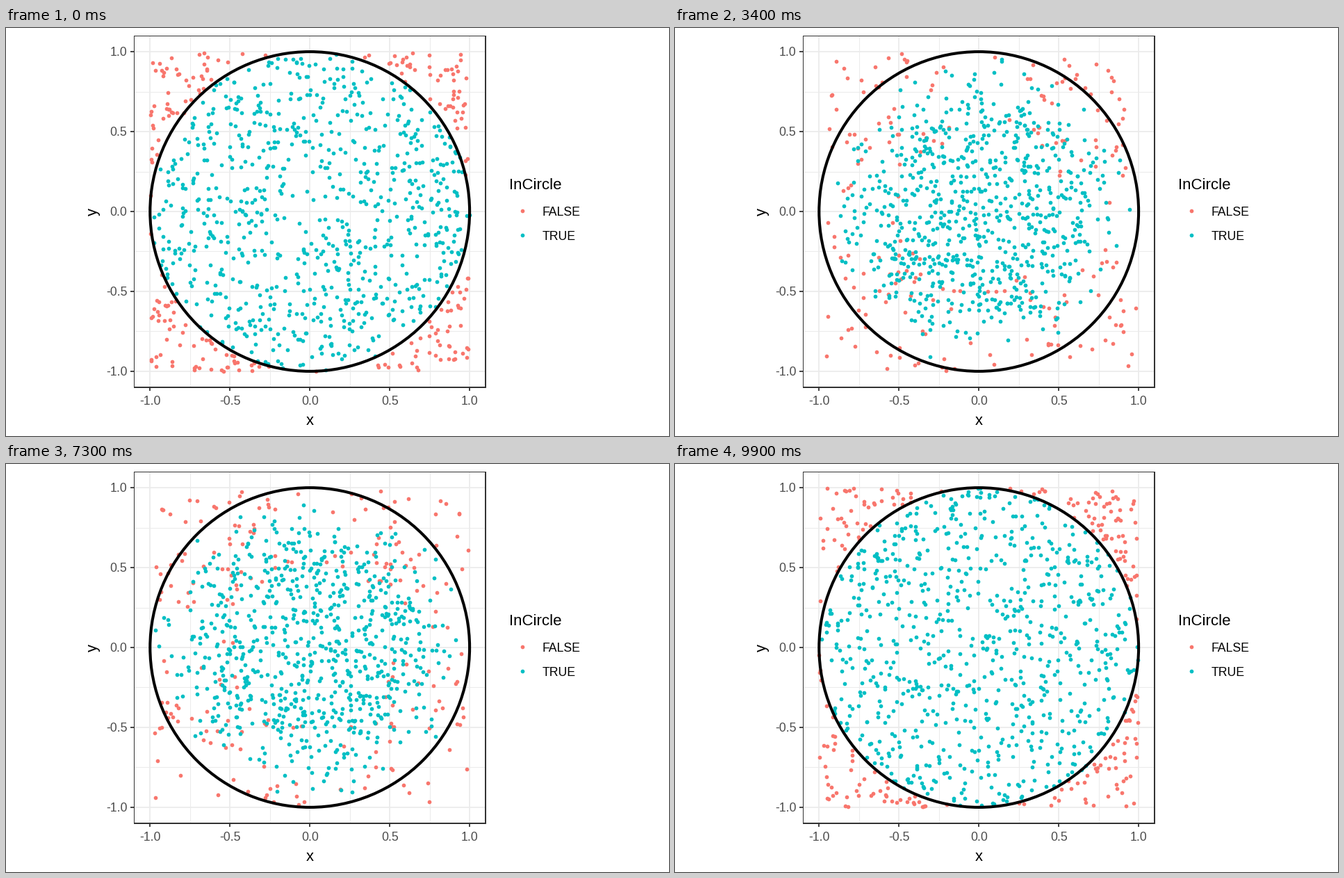
Animation, 954 px wide and 587 px high, one loop 10000 ms. Source, as a matplotlib script:

```python
import numpy as np
import matplotlib.pyplot as plt
from matplotlib.animation import FuncAnimation
from matplotlib.patches import Circle, Rectangle

W, H, DPI = 954, 587, 128
PX = 72 / DPI                      # points per pixel
FRAMES, INTERVAL = 100, 100
SAMPLES, POINTS = 25, 1000

CX, CY, UNIT = 437.2, 264, 229.9
PAD = 1.1 * UNIT
LEFT, RIGHT, TOP, BOTTOM = CX - PAD, CX + PAD, CY - PAD, CY + PAD

RED, TEAL = "#F8766D", "#00BFC4"
GRID, DARK, LABEL = "#EBEBEB", "#333333", "#4D4D4D"
DOT = 5.7

plt.rcParams["font.family"] = "Liberation Sans"
fig = plt.figure(figsize=(W / DPI, H / DPI), dpi=DPI, facecolor="white")
ax = fig.add_axes([0, 0, 1, 1])
ax.set_xlim(0, W)
ax.set_ylim(H, 0)
ax.axis("off")


def to_px(xy):
    return np.column_stack((CX + UNIT * xy[:, 0], CY - UNIT * xy[:, 1]))


def line(xs, ys, color, width, z):
    ax.plot(xs, ys, color=color, lw=width * PX, zorder=z,
            solid_capstyle="butt")


def text(x, y, s, size, color="black", ha="left", **kw):
    ax.text(x, y, s, fontsize=size * PX, color=color, ha=ha,
            va="baseline", **kw)


def dots(xy, color):
    return ax.scatter(xy[:, 0], xy[:, 1], s=(DOT * PX) ** 2, c=color,
                      linewidths=0, zorder=3)


def draw_panel():
    for v in (-0.75, -0.25, 0.25, 0.75):
        line([CX + v * UNIT] * 2, [TOP, BOTTOM], GRID, 1.07, 1)
        line([LEFT, RIGHT], [CY - v * UNIT] * 2, GRID, 1.07, 1)
    for v in (-1, -0.5, 0, 0.5, 1):
        x, y = CX + v * UNIT, CY - v * UNIT
        line([x, x], [TOP, BOTTOM], GRID, 1.8, 2)
        line([LEFT, RIGHT], [y, y], GRID, 1.8, 2)
        line([x, x], [BOTTOM, BOTTOM + 5.5], DARK, 1.8, 2)
        line([LEFT - 5.5, LEFT], [y, y], DARK, 1.8, 2)
        text(x, 541.8, f"{v:.1f}", 17.6, LABEL, "center")
        text(LEFT - 10, y + 6.4, f"{v:.1f}", 17.6, LABEL, "right")
    ax.add_patch(Circle((CX, CY), UNIT, fill=False, ec="black",
                        lw=4.1 * PX, zorder=4))
    # The border is clipped by the panel, so its top and left look thinner.
    border = Rectangle((LEFT, TOP), 2 * PAD, 2 * PAD, fill=False,
                       ec=DARK, lw=2 * PX, zorder=5)
    ax.add_patch(border)
    border.set_clip_path(Rectangle((LEFT, TOP), 2 * PAD + 1, 2 * PAD + 1,
                                   transform=ax.transData))
    text(CX - 0.4, 571.3, "x", 22, ha="center")
    text(131, CY, "y", 22, ha="center", rotation=90,
         rotation_mode="anchor")


def draw_legend():
    text(724.4, 232.5, "InCircle", 22.3)
    for y, name, color in ((263.2, "FALSE", RED), (298, "TRUE", TEAL)):
        dots(np.array([[743.2, y]]), color)
        text(771.7, y + 6.8, name, 17.6)


# Each sample is split into (outside, inside) the unit circle.
rng = np.random.default_rng(314)
samples = []
for _ in range(SAMPLES):
    pts = rng.uniform(-1, 1, (POINTS, 2))
    inside = np.hypot(pts[:, 0], pts[:, 1]) <= 1
    samples.append((pts[~inside], pts[inside]))

# Frame on which each sample is shown exactly.
keys = np.round(np.linspace(1, FRAMES, SAMPLES)).astype(int) - 1

draw_panel()
draw_legend()
empty = np.empty((0, 2))
clouds = [dots(empty, RED), dots(empty, TEAL)]


def update(i):
    k = np.searchsorted(keys, i, side="right") - 1
    for part, cloud in enumerate(clouds):
        pts = samples[k][part]
        if i > keys[k]:
            nxt = samples[k + 1][part]
            t = (i - keys[k]) / (keys[k + 1] - keys[k])
            n = min(len(pts), len(nxt))
            pts = (1 - t) * pts[:n] + t * nxt[:n]
        cloud.set_offsets(to_px(pts))
    return clouds


anim = FuncAnimation(fig, update, frames=FRAMES, interval=INTERVAL,
                     init_func=lambda: update(0), repeat=True,
                     repeat_delay=0, blit=False)
plt.show()
```
